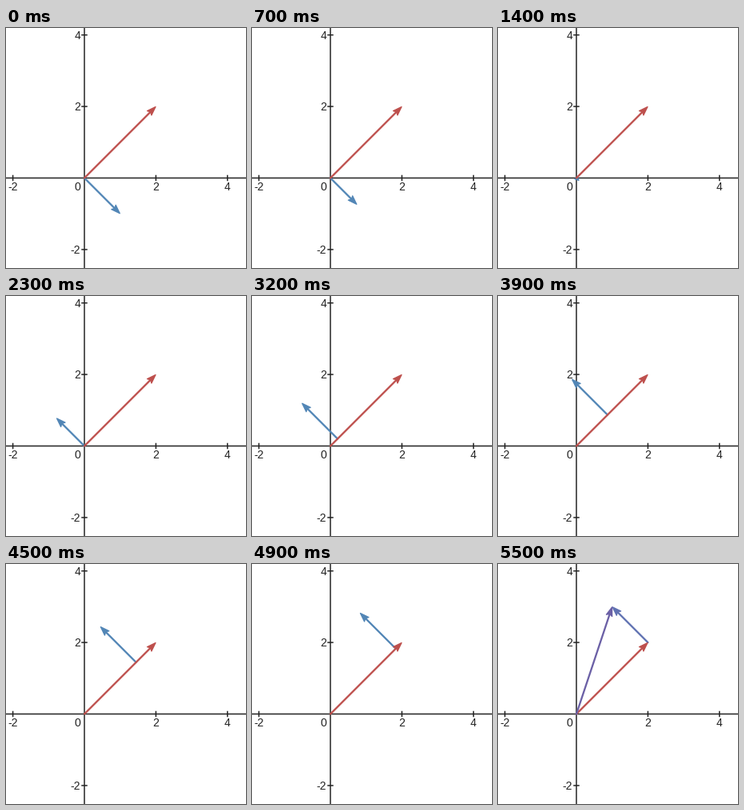
A matplotlib script that plays this animation: 300 px wide and 300 px high, repeating every 6 s.

```python
import matplotlib.pyplot as plt
import numpy as np
from matplotlib.animation import FuncAnimation
from matplotlib.patches import Polygon

SIZE, DPI = 300, 100
PX = 72 / DPI
STEP, LOOP = 100, 6000
ORIGIN = np.array([98.0, 187.5])
UNIT = 44.7

INK = "#222222"
RED, BLUE, PURPLE = "#be504d", "#5286b6", "#6b60a6"
BLUE_END = "#6072b2"

fig = plt.figure(figsize=(SIZE / DPI, SIZE / DPI), dpi=DPI, facecolor="white")
ax = fig.add_axes([0, 0, 1, 1])
ax.set_xlim(0, SIZE)
ax.set_ylim(SIZE, 0)
ax.axis("off")


def to_px(p):
    return ORIGIN + UNIT * np.array([p[0], -p[1]])


def rule(x0, y0, x1, y1):
    ax.plot([x0, x1], [y0, y1], color=INK, lw=1.5 * PX, snap=False, zorder=1)


def label(x, y, text, ha):
    ax.text(x, y, text, ha=ha, va="baseline", color=INK,
            family="Liberation Sans", size=14 * PX, zorder=2)


class Arrow:
    HEAD, HALF, NOTCH = 11.0, 3.8, 2.0

    def __init__(self, color, z):
        self.line, = ax.plot([], [], lw=2.3 * PX, solid_capstyle="round", zorder=z)
        self.head = ax.add_patch(Polygon(np.zeros((4, 2)), lw=1.3 * PX,
                                         joinstyle="round", zorder=z))
        self.paint(color)

    def paint(self, color):
        self.line.set_color(color)
        self.head.set_color(color)

    def show(self, on):
        self.line.set_visible(on)
        self.head.set_visible(on)

    def place(self, tail, tip):
        a, b = to_px(tail), to_px(tip)
        length = np.hypot(*(b - a))
        self.show(length > 0.3)
        if length <= 0.3:
            return
        u = (b - a) / length
        v = np.array([-u[1], u[0]])
        size = min(self.HEAD, length)
        b = b - 0.6 * u
        back = b - size * u
        half = self.HALF * max(size / self.HEAD, 0.6)
        neck = back + self.NOTCH * size / self.HEAD * u
        self.head.set_xy([b, back + half * v, neck, back - half * v])
        self.line.set_data([a[0], neck[0]], [a[1], neck[1]])


def ramp(t, start, end):
    return float(np.clip((t - start) / (end - start), 0, 1))


# Axes, ticks and numbers
ox, oy = ORIGIN
rule(0, oy, SIZE, oy)
rule(ox, 0, ox, SIZE)
for n in (-2, 2, 4):
    x, y = to_px((n, n))
    rule(x, oy - 3, x, oy + 3)
    rule(ox - 3, y, ox + 3, y)
    label(x, 203, str(n), "center")
    label(93, y + 5, str(n), "right")
label(93, 203, "0", "right")

blue = Arrow(BLUE, 3)
red = Arrow(RED, 4)
purple = Arrow(PURPLE, 5)
red.place((0, 0), (2, 2))
purple.place((0, 0), (1, 3))


def draw(i):
    t = i * STEP
    k = 1 - 2 * ramp(t, 430, 2530)      # flip the vector
    s = 2 * ramp(t, 2990, 5080)         # slide it along the other one
    blue.place((s, s), (s + k, s - k))
    done = t >= 5500
    blue.paint(BLUE_END if done else BLUE)
    purple.show(done)
    return []


anim = FuncAnimation(fig, draw, frames=LOOP // STEP, interval=STEP,
                     repeat=True, repeat_delay=0)
plt.show()
```
